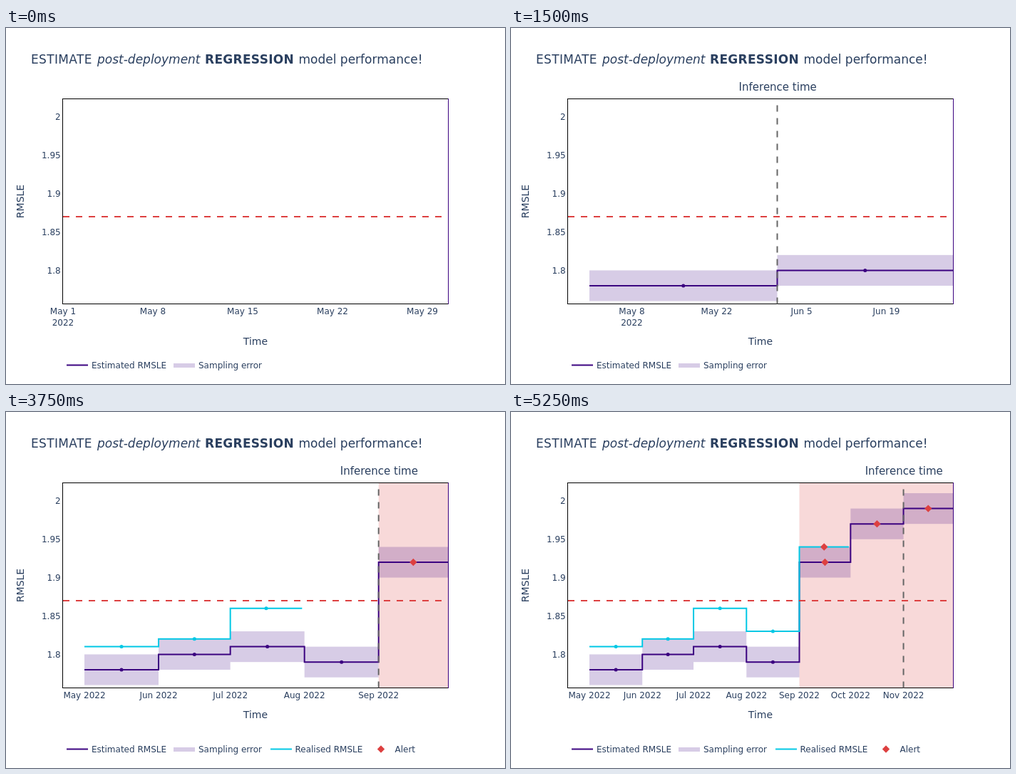
These frames come from a looping animation (700x500 px, 6000 ms). An HTML page:

```html
<!DOCTYPE html>
<html lang="en">
<head>
<meta charset="utf-8">
<title>Estimated regression performance</title>
<style>
  html, body { margin: 0; width: 100%; height: 100%; overflow: hidden; background: #fff; }
  svg { display: block; width: 700px; height: 500px; }
  text { font-family: "DejaVu Sans", Verdana, sans-serif; font-size: 12px; fill: #2a3f5f; white-space: pre; }
  .mid { text-anchor: middle; }
  .end { text-anchor: end; }
  .axis { font-size: 14px; }
  .note { font-size: 15px; }
  .title { font-size: 17px; }
</style>
</head>
<body>
<svg id="stage" viewBox="0 0 700 500" xmlns="http://www.w3.org/2000/svg"></svg>
<script>
const PURPLE = '#3b0280', CYAN = '#00c8e5', RED = '#dd4040', GREY = '#666';
const STEP = 750, LOOP = 6000;
const LEFT = 80, RIGHT = 620, TOP = 99.5, BOTTOM = 387.5;
const DAY = 864e5, START = Date.UTC(2022, 4, 1);
const MONTHS = ['May', 'Jun', 'Jul', 'Aug', 'Sep', 'Oct', 'Nov'];
const estimated = [1.78, 1.80, 1.81, 1.79, 1.92, 1.97, 1.99];
const realised = [1.81, 1.82, 1.86, 1.83, 1.94];
const MARGIN = 0.02, LIMIT = 1.87, FIRST_ALERT = 4;

const stage = document.getElementById('stage');
const monthDay = m => (Date.UTC(2022, 4 + m, 1) - START) / DAY;
const yOf = v => 340.4 - (v - 1.8) * 1078;

const text = (x, y, s, cls = '', extra = '') => `<text x="${x}" y="${y}" class="${cls}" ${extra}>${s}</text>`;
const line = (x1, y1, x2, y2, color, w = 2, extra = '') =>
  `<path d="M${x1} ${y1}L${x2} ${y2}" stroke="${color}" stroke-width="${w}" ${extra}/>`;
const rect = (x, y, w, h, color) =>
  `<rect x="${x}" y="${y}" width="${w}" height="${h}" fill="${color}" fill-opacity=".2"/>`;
const dot = (x, y, color) => `<circle cx="${x}" cy="${y}" r="2.5" fill="${color}"/>`;
const diamond = (x, y) => `<path d="M${x - 5.2} ${y}l5.2 -5.2l5.2 5.2l-5.2 5.2z" fill="${RED}"/>`;

// Stepped line with one marker per month; the last month ends on its last day.
function series(values, xOf, color) {
  let path = '', marks = '';
  values.forEach((v, m) => {
    const a = xOf(monthDay(m));
    const b = xOf(monthDay(m + 1) - (m === values.length - 1 ? 1 : 0));
    const y = yOf(v), mid = (a + b) / 2;
    path += `${m ? 'L' : 'M'}${a} ${y}H${b}`;
    marks += m < FIRST_ALERT ? dot(mid, y, color) : diamond(mid, y);
  });
  return [`<path d="${path}" fill="none" stroke="${color}" stroke-width="2"/>`, marks];
}

function xTicks(n, xOf, last) {
  let out = '';
  if (n > 3) {
    for (let m = 0; m < n; m++) out += text(xOf(monthDay(m)), 402, MONTHS[m] + ' 2022', 'mid');
    return out;
  }
  const first = n < 2 ? 0 : 7, gap = n < 2 ? 7 : 14;
  for (let d = first; d <= last; d += gap) {
    const date = new Date(START + d * DAY);
    out += text(xOf(d), 402, MONTHS[date.getUTCMonth() - 4] + ' ' + date.getUTCDate(), 'mid');
    if (d === first) out += text(xOf(d), 417.6, '2022', 'mid');
  }
  return out;
}

function legend(n) {
  const y = 473.5, base = 478;
  let out = line(85, y, 115, y, PURPLE) + text(120, base, 'Estimated RMSLE') +
    rect(235, 471, 30, 6, PURPLE) + text(270, base, 'Sampling error');
  if (n > 2) out += line(371, y, 401, y, CYAN) + text(405.5, base, 'Realised RMSLE');
  if (n > 4) out += diamond(526, y) + text(545.5, base, 'Alert');
  return out;
}

function title() {
  return text(35, 50, 'ESTIMATE', 'title', 'letter-spacing=".35"') +
    text(128, 50, 'post-deployment', 'title', 'font-style="italic"') +
    text(279, 50, 'REGRESSION', 'title', 'font-weight="bold" letter-spacing=".3"') +
    text(410.5, 50, 'model performance!', 'title');
}

function frame() {
  const edge = 'shape-rendering="crispEdges"';
  return line(79, TOP, 621, TOP, '#000', 1, edge) +
    line(79, BOTTOM, 621, BOTTOM, '#000', 1, edge) +
    line(79.5, 99, 79.5, 388, '#000', 1, edge) +
    line(620.5, 99, 620.5, 388, PURPLE, 1, edge);
}

// n is the number of months with an estimate.
function draw(n) {
  const last = monthDay(Math.max(n, 1)) - 1;
  const x0 = n === 0 ? LEFT : n === 1 ? 137.7 : 110;
  const xOf = d => x0 + d * (RIGHT - x0) / last;
  const dash = 'stroke-dasharray="9 9"';
  let out = title();

  if (n > FIRST_ALERT) {
    const x = xOf(monthDay(FIRST_ALERT));
    out += rect(x, TOP, RIGHT - x, BOTTOM - TOP, RED);
  }
  const values = estimated.slice(0, n);
  values.forEach((v, m) => {
    const a = xOf(monthDay(m)), b = Math.min(RIGHT, xOf(monthDay(m + 1)));
    out += rect(a, yOf(v + MARGIN), b - a, yOf(v - MARGIN) - yOf(v + MARGIN), PURPLE);
  });
  out += frame();

  const [estLine, estMarks] = series(values, xOf, PURPLE);
  const [realLine, realMarks] = series(realised.slice(0, Math.max(0, n - 2)), xOf, CYAN);
  if (n) out += estLine;
  if (n > 2) out += realLine;
  out += estMarks + realMarks;

  out += line(LEFT, yOf(LIMIT), RIGHT, yOf(LIMIT), RED, 2, dash);
  if (n) {
    const x = xOf(monthDay(n - 1));
    out += line(x, BOTTOM, x, TOP, GREY, 2, dash) + text(x + .7, 88, 'Inference time', 'note mid');
  }

  for (const v of [1.8, 1.85, 1.9, 1.95, 2]) out += text(76.7, yOf(v) + 4.2, v, 'end');
  out += xTicks(n, xOf, last);
  out += text(350, n > 3 ? 430 : 445, 'Time', 'axis mid');
  out += text(0, 0, 'RMSLE', 'axis mid', 'transform="translate(25 243.5) rotate(-90)"');
  stage.innerHTML = out + legend(n);
}

let shown = -1;
function tick() {
  const n = Math.floor(performance.now() % LOOP / STEP);
  if (n !== shown) draw(shown = n);
  requestAnimationFrame(tick);
}
tick();
</script>
</body>
</html>
```
